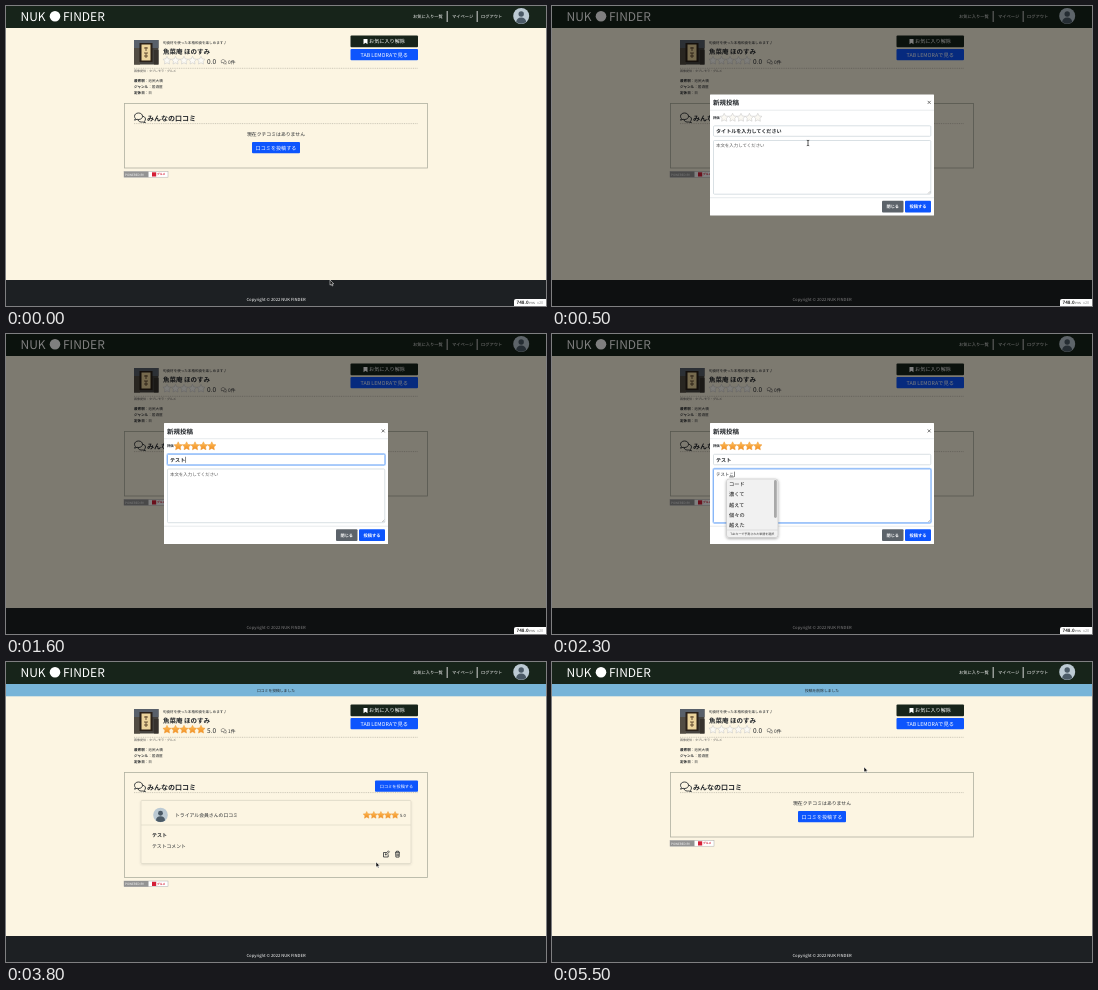
Animation of 540x300 px, one loop 5.6 s. Source, as an HTML page:

```html
<!DOCTYPE html>
<html lang="ja">
<head>
<meta charset="utf-8">
<title>Review demo</title>
<style>
  html, body { margin: 0; width: 100%; height: 100%; overflow: hidden; background: #fcf5e2; }
  svg { display: block; width: 540px; height: 300px; }
  text { font-family: "Noto Sans CJK JP", "Noto Sans CJK", "Noto Sans", sans-serif; text-rendering: geometricPrecision; white-space: pre; }
</style>
</head>
<body>
<svg id="stage" viewBox="0 0 540 300" xmlns="http://www.w3.org/2000/svg"></svg>
<script>
const LOOP = 5600, STEP = 100;
const CREAM = '#fcf5e2', INK = '#212529', BLUE = '#0d55fd', GREEN = '#17241a';

// Moments of the story, in ms
const AT = { modal: 400, focusTitle: 1200, focusBody: 1800, blur: 3000, posted: 3600,
  hover: 4100, confirm: 4300, unhover: 4800, confirmed: 4900, deleted: 5000 };

// time, text, number of characters still being composed
const TITLE = [[1300, 'ｔ', 1], [1400, 'て', 1], [1500, 'てす', 2], [1600, 'テスト', 0]];
const BODY = [[1900, 'て', 1], [2000, 'てす', 2], [2100, 'テスト', 0], [2200, 'テストｋ', 1],
  [2300, 'テストこ', 1], [2400, 'テストこｍ', 2], [2500, 'テストこめ', 2], [2600, 'テストこめん', 3],
  [2700, 'テストこめんと', 4], [2800, 'テストコメント', 4], [2900, 'テストコメント', 0]];

// time, x, y, pointer shape
const POINTER = [[0, 324, 274, 'arrow'], [200, 272, 143, 'hand'], [300, 271, 142, 'hand'], [400, 260, 139, 'arrow'],
  [500, 256, 137, 'beam'], [600, 244, 130, 'beam'], [700, 172, 113, 'hand'], [1000, 207, 113, 'hand'],
  [1100, 204, 126, 'beam'], [1300, 204, 126, 'none'], [1700, 205, 130, 'beam'], [1800, 212, 152, 'beam'],
  [1900, 212, 152, 'none'], [3000, 222, 160, 'beam'], [3200, 318, 190, 'arrow'], [3300, 360, 200, 'hand'],
  [3400, 364, 202, 'hand'], [3600, 364, 202, 'arrow'], [3800, 370, 200, 'arrow'], [4100, 391, 193, 'hand'],
  [4300, 391, 193, 'arrow'], [4400, 382, 160, 'arrow'], [4600, 332, 37, 'arrow'], [4700, 323, 19, 'arrow'],
  [5000, 322, 20, 'arrow'], [5400, 312, 105, 'arrow'], [5600, 312, 105, 'arrow']];

const rect = (x, y, w, h, fill, more = '') =>
  `<rect x="${x}" y="${y}" width="${w}" height="${h}" fill="${fill}" ${more}/>`;
const circle = (x, y, r, fill, more = '') => `<circle cx="${x}" cy="${y}" r="${r}" fill="${fill}" ${more}/>`;
const path = (d, more = '') => `<path d="${d}" ${more}/>`;
const group = (x, y, inner, more = '') => `<g transform="translate(${x} ${y})" ${more}>${inner}</g>`;
const line = (x1, x2, y, color, more = '') =>
  path(`M${x1} ${y}H${x2}`, `stroke="${color}" stroke-width=".7" ${more}`);

// Text is placed by its vertical centre
const text = (x, y, size, str, fill = INK, weight = 400, anchor = 'start') =>
  `<text x="${x}" y="${(y + size * .37).toFixed(2)}" font-size="${size}" fill="${fill}" font-weight="${weight}" text-anchor="${anchor}">${str}</text>`;
const button = (x, y, w, h, label, size, fill = BLUE, weight = 400) =>
  rect(x, y, w, h, fill, 'rx="1"') + text(x + w / 2, y + h / 2, size, label, '#fff', weight, 'middle');

function star(x, y, r, on) {
  const points = Array.from({ length: 10 }, (_, i) => {
    const a = i * Math.PI / 5, d = i % 2 ? r * .5 : r;
    return `${(x + d * Math.sin(a)).toFixed(2)},${(y - d * Math.cos(a)).toFixed(2)}`;
  }).join(' ');
  const paint = on ? 'fill="url(#gold)" stroke="#ee9a35"' : 'fill="#fbf9f3" stroke="#c3c3c3"';
  return `<polygon points="${points}" ${paint} stroke-width=".5" stroke-linejoin="round"/>`;
}
const stars = (x, y, pitch, r, count) =>
  [0, 1, 2, 3, 4].map(i => star(x + i * pitch, y, r, i < count)).join('');

const avatar = (x, y, r) => group(x, y, circle(0, 0, 8, '#bccad3') +
  circle(0, -2, 2.7, '#4b5a66') + path('M-5 6Q-4.500 1.500 0 1.500T5 6Q0 9.500-5 6Z', 'fill="#4b5a66"'),
  '').replace(')"', `) scale(${r / 8})"`);

const bubbles = (x, y, k) => `<g transform="translate(${x} ${y}) scale(${k})" fill="${CREAM}" stroke="${INK}" stroke-width=".85">` +
  path('M7 3.500C10 3.500 11.500 5 11.500 6.500C11.500 7.500 11 8.200 10.400 8.700L11.400 10.200L8.700 9.500C6.500 9.900 4.500 9 4 7.500Z') +
  path('M4.500 .5C7 .5 8.500 2 8.500 3.800S7 7 4.500 7L3 6.800L.6 7.700L1.400 5.900C.8 5.300 .5 4.600 .5 3.800C.5 2 2 .5 4.500 .5Z') + '</g>';

const lantern = rect(128, 34, 24.5, 24.5, '#45423e') + rect(128, 34, 24.5, 8, '#59606a') +
  rect(128, 42, 6, 16.5, '#524c43') + rect(133.5, 37, 13, 19, '#2b2119') + rect(135.5, 38.500, 9, 16, '#ecd49c') +
  path('M138 42h4M140 41v4M138 47h4M138 50h4M140 47v5', 'stroke="#4a3420" stroke-width=".8"') +
  rect(148, 44, 4.5, 14.5, '#37322d');

const header = rect(0, 0, 540, 22, GREEN) + text(14.5, 10.3, 12, 'NUK', '#fff') + circle(49, 10.3, 5.3, '#fff') +
  text(57, 10.3, 12, 'FINDER', '#fff') +
  text(407, 10.5, 4.25, 'お気に入り一覧', '#fff') + text(446, 10.5, 4.25, 'マイページ', '#fff') +
  text(475, 10.5, 4.25, 'ログアウト', '#fff') +
  rect(440.7, 5, .9, 11, '#e8e8e8') + rect(470.7, 5, .9, 11, '#e8e8e8') + avatar(515.2, 10, 8);

const footer = rect(0, 274, 540, 26, '#1d2023') +
  text(270, 293.5, 4.2, 'Copyright © 2022 NUK FINDER', '#fff', 400, 'middle');

const dotted = (x1, x2, y) => line(x1, x2, y, '#b9b5a6', 'stroke-dasharray="1 .8"');
const fact = (y, label, value) => text(128, y, 3.6, `<tspan font-weight="700">${label}</tspan>：${value}`);

const shop = reviewed => lantern + text(157, 36.6, 3.55, '旬食材を使った本格和食を楽しめます♪') +
  text(157, 45.2, 6.5, '魚菜庵 ほのすみ', INK, 700) + stars(161, 54.6, 8.5, 4.3, reviewed ? 5 : 0) +
  text(201, 55.3, 6.5, reviewed ? '5.0' : '0.0') + bubbles(215, 53.3, .47) +
  text(222, 55.8, 4.8, reviewed ? '1件' : '0件') + dotted(128, 412, 62.3) +
  text(128, 65.2, 3, '画像提供：タブレモラ・グルメ', '#555') +
  fact(74.2, '最寄駅', '池尻大橋') + fact(80.2, 'ジャンル', '居酒屋') + fact(86.2, '定休日', '日') +
  rect(344.5, 29.5, 67.5, 11.7, GREEN, 'rx="1"') + path('M357.500 33h4v5.200l-2-1.500l-2 1.500z', 'fill="#fff"') +
  text(363, 35.4, 5.15, 'お気に入り解除', '#fff') + button(344.5, 43, 67.5, 11.3, 'TAB LEMORAで見る', 5.3);

const credit = y => rect(118, y, 44, 5.7, '#fff', 'stroke="#aaa" stroke-width=".5"') + rect(118, y, 24.5, 5.7, '#939393') +
  text(119, y + 2.9, 3.1, 'POWERED BY', '#fff') + rect(146, y + .8, 4.2, 4.2, '#d51f36') +
  text(151, y + 2.9, 2.8, 'グルメ', '#d51f36', 700);

const review = rect(135, 125.5, 270, 63, CREAM, 'rx="1" stroke="#ddd7c6" stroke-width=".7" filter="url(#soft)"') +
  avatar(154.5, 140, 7.3) + text(169, 140.3, 4.85, 'トライアル会員さんの口コミ') + stars(360.7, 140.2, 7.1, 3.7, 5) +
  text(394, 140.4, 4.2, '5.0') + line(135, 405, 150, '#ddd7c6') +
  text(146, 160.2, 5, 'テスト', INK, 700) + text(146, 171.7, 4.85, 'テストコメント') +
  `<g fill="none" stroke="${INK}" stroke-width=".75">` +
  path('M380.500 177.500h-3v4.500h4.700v-2.600M379.300 180l.3-1.400l2.800-2.700l1 1l-2.800 2.800z') +
  path('M389 177.300h5M390.500 177.200v-1h2v1M389.600 177.500l.3 4.600h3.200l.3-4.600M391 178.500v2.600M392.200 178.500v2.600') + '</g>';

const board = reviewed => rect(118.5, 97.5, 303, reviewed ? 105 : 64.5, 'none', 'stroke="#afb0a0" stroke-width=".8"') +
  bubbles(128, 106.5, 1) + text(141, 112.2, 7, 'みんなの口コミ', INK, 700) + dotted(128, 412, 117.6) +
  (reviewed
    ? button(369, 105.5, 43, 11.2, '口コミを投稿する', 4.2) + review + credit(206)
    : text(270, 127.8, 4.85, '現在クチコミはありません', INK, 400, 'middle') +
      button(246, 136, 48, 11.3, '口コミを投稿する', 5.1) + credit(165.5));

function page(t) {
  const flash = t >= AT.posted, reviewed = flash && t < AT.deleted;
  const notice = reviewed ? '口コミを投稿しました' : '投稿を削除しました';
  return rect(0, 0, 540, 300, CREAM) + header + footer +
    (flash ? rect(0, 22, 540, 12.3, '#77b4d8') + text(270, 28.2, 3.8, notice, INK, 400, 'middle') : '') +
    group(0, flash ? 13 : 0, shop(reviewed) + board(reviewed));
}

const typed = (table, t) => table.filter(k => k[0] <= t).pop() || [0, '', 0];

function field(x, y, w, h, focused) {
  const glow = focused ? rect(x - .6, y - .6, w + 1.2, h + 1.2, 'none', 'rx="1.5" stroke="#b9d5fc" stroke-width="1.2"') : '';
  return glow + rect(x, y, w, h, '#fff', `rx="1" stroke="${focused ? '#5c9df5' : '#c9d3d9'}" stroke-width=".7"`);
}

function entry(y, size, weight, hint, [, value, composing], focused) {
  const x = 164, end = x + value.length * size;
  return (value ? text(x, y, size, value, INK, weight) : text(x, y, size, hint, weight > 400 ? INK : '#555', weight)) +
    (composing ? line(end - composing * size, end, y + size * .58, '#333') : '') +
    (focused ? rect(end + .3, y - size * .6, .5, size * 1.2, '#111') : '');
}

const candidates = rect(174.5, 145, 51.5, 58.5, '#f1f1f1', 'rx="2.500" stroke="#bbb" stroke-width=".5" filter="url(#drop)"') +
  ['コード', '濃くて', '越えて', '個々の', '越えた'].map((word, i) => text(177, 150 + i * 10.3, 5.2, word, '#111')).join('') +
  rect(222, 146, 2.8, 38, '#a9a9a9', 'rx="1.400"') + line(174.5, 226, 196, '#d5d5d5') +
  text(200.3, 199.6, 3, 'Tabキーで予測された単語を選択', '#333', 400, 'middle');

function modal(t) {
  if (t < AT.modal || t >= AT.posted) return '';
  const open = t < 500 ? .6 : 1, lift = t < 500 ? -5 : t < 600 ? -.5 : 0;
  const inTitle = t >= AT.focusTitle && t < AT.focusBody, inBody = t >= AT.focusBody && t < AT.blur;
  const rated = Math.max(0, Math.min(5, Math.floor((t - 700) / 75) + 1));
  const box = rect(158, 89, 224, 121, '#fff', 'rx=".5"') + text(161, 97.2, 6.5, '新規投稿', INK, 700) +
    path('M375.700 95.400l3 3m0-3l-3 3', 'stroke="#555" stroke-width=".8"') + line(158, 382, 104.7, '#dee2e6') +
    text(161, 111.8, 3.3, '評価', INK, 700) + stars(172.2, 112.2, 8.4, 4.4, t < 700 ? 0 : rated) +
    field(161.5, 120.3, 217.3, 10.5, inTitle) +
    entry(125.8, 5.07, 700, 'タイトルを入力してください', typed(TITLE, t), inTitle) +
    field(161.5, 135, 217.3, 53.7, inBody) +
    entry(140.3, 4.45, 400, '本文を入力してください', typed(BODY, t), inBody) +
    path('M376 188l2.300-2.300M377.300 188l1-1', 'stroke="#777" stroke-width=".4"') + line(158, 382, 192.2, '#dee2e6') +
    button(330, 195.3, 21.5, 11.7, '閉じる', 4.2, '#5c636a', 700) + button(353, 195.3, 26, 11.7, '投稿する', 4.3, BLUE, 700);
  return rect(0, 0, 540, 300, '#000', `opacity="${open / 2}"`) + group(0, lift, box, `opacity="${open}"`) +
    (t >= 2200 && t < 2500 ? candidates : '');
}

const timer = rect(508, 293, 34, 9, '#fff', 'rx="2"') + text(510.5, 296.4, 4.5, '748.0', '#222', 700) +
  text(523.3, 296.5, 3.9, 'ms', '#555') + text(531, 296.5, 3.9, 'x20', '#999');

const dialog = rect(198, -3, 144, 32, '#fff', 'rx="2" filter="url(#drop)"') + text(203, 5.6, 3.8, '削除しますか?') +
  text(291.5, 18.9, 3.6, 'キャンセル', '#1a5fd6', 500, 'middle') + button(308.3, 13.8, 28.4, 10.2, 'OK', 4, '#1558d6', 500);

const address = rect(0, 293, 50, 7, '#25282b', 'rx="1"') + text(2, 296.6, 3.9, 'localhost:3000/reviews/3', '#eee');

const SHAPES = {
  none: '',
  arrow: path('M0 0V5.200L1.200 4.100L2.100 6L3 5.600L2.200 3.800H3.800Z', 'fill="#111" stroke="#fff" stroke-width=".5"'),
  beam: path('M-1.200-2.700Q0-2.700 0-2V2Q0 2.700-1.200 2.700M1.200-2.700Q0-2.700 0-2M0 2Q0 2.700 1.200 2.700', 'fill="none" stroke="#111" stroke-width=".7"'),
  hand: path('M-.6-2Q0-2.800 .5-2V0L2.500.5Q3 .8 2.800 2L2.200 3.800H-.6L-2.200 1.400Q-2 .6-.6 1.400Z', 'fill="#fff" stroke="#111" stroke-width=".5"'),
};

function pointer(t) {
  const i = POINTER.findLastIndex(k => k[0] <= t);
  const a = POINTER[i], b = POINTER[i + 1] || a;
  const p = a === b ? 0 : (t - a[0]) / (b[0] - a[0]), ease = p * p * (3 - 2 * p);
  return group(a[1] + (b[1] - a[1]) * ease, a[2] + (b[2] - a[2]) * ease, SHAPES[a[3]]);
}

const defs = `<defs>
  <linearGradient id="gold" x2="0" y2="1"><stop stop-color="#ffc05a"/><stop offset="1" stop-color="#f08c22"/></linearGradient>
  <filter id="soft"><feDropShadow dx="0" dy=".8" stdDeviation="1" flood-opacity=".12"/></filter>
  <filter id="drop" x="-20%" y="-20%" width="140%" height="150%"><feDropShadow dx="0" dy="1" stdDeviation="1.5" flood-opacity=".35"/></filter>
</defs>`;

const between = (t, from, to, part) => t >= from && t < to ? part : '';
const scene = t => defs + page(t) + modal(t) + between(t, 0, AT.posted, timer) +
  between(t, AT.confirm, AT.confirmed, dialog) + between(t, AT.hover, AT.unhover, address) + pointer(t);

const stage = document.getElementById('stage');
const start = performance.now();
let shown = -1;
function tick() {
  const t = Math.floor((performance.now() - start) % LOOP / STEP) * STEP;
  if (t !== shown) stage.innerHTML = scene(shown = t);
  requestAnimationFrame(tick);
}
tick();
</script>
</body>
</html>
```
